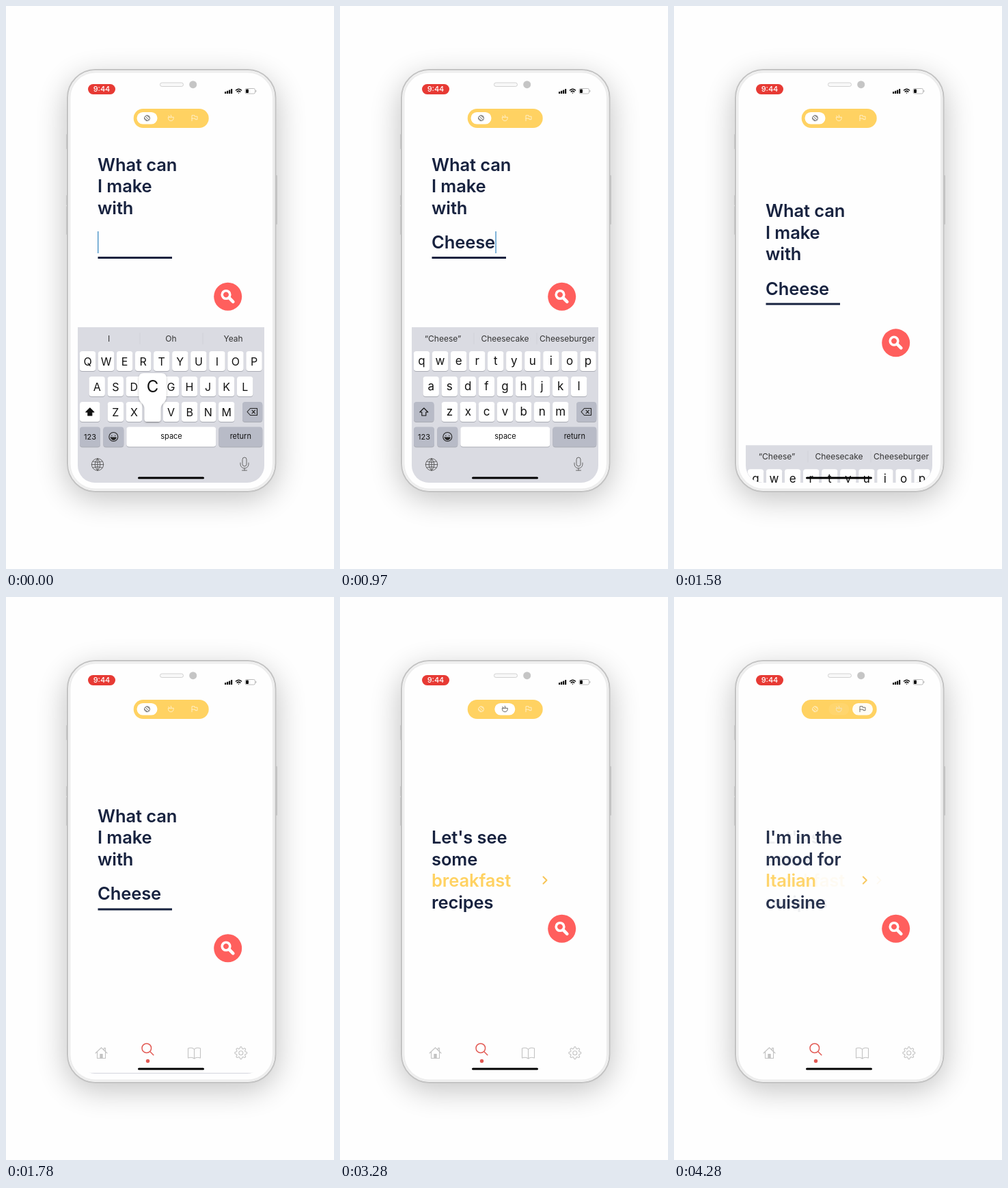
Write an HTML page that moves like this. It is 480 px wide and 822 px high and loops after 4380 ms.

```html
<!DOCTYPE html>
<html lang="en">
<head>
<meta charset="utf-8">
<style>
  html, body { margin: 0; width: 100%; height: 100%; overflow: hidden; background: #fefefe; }
  svg { display: block; width: 480px; height: 822px; font-family: Inter, "Liberation Sans", sans-serif; }
  .head { font-size: 25.5px; font-weight: 600; letter-spacing: -.1px; fill: #17223f; }
  .mid { text-anchor: middle; fill: #111; }
  .line { fill: none; stroke-linecap: round; stroke-linejoin: round; }
</style>
</head>
<body>
<svg viewBox="0 0 480 822">
  <defs>
    <filter id="blur" x="-40%" y="-20%" width="180%" height="140%"><feGaussianBlur stdDeviation="22"/></filter>
    <filter id="lift" x="-20%" y="-20%" width="140%" height="140%"><feDropShadow dx="0" dy="1" stdDeviation="1.5" flood-opacity=".3"/></filter>
    <clipPath id="screen"><rect x="105" y="110" width="273" height="586" rx="25"/></clipPath>
  </defs>
  <g id="phone"></g>
  <g id="tabs"></g>
  <g id="pages"></g>
  <g id="find"></g>
  <g clip-path="url(#screen)"><g id="board"></g></g>
  <rect x="193" y="687.5" width="97" height="3" rx="1.5"/>
  <g id="modes"></g>
</svg>
<script>
const LOOP = 4380, NAVY = '#17223f', YELLOW = '#ffd262', RED = '#ff5f5d';
const $ = id => document.getElementById(id);
const clamp = x => Math.min(1, Math.max(0, x));
const span = (t, a, b) => clamp((t - a) / (b - a));
const easeOut = x => 1 - (1 - x) ** 3;
const smooth = x => x * x * (3 - 2 * x);

const rect = (x, y, w, h, r, fill, more = '') =>
  `<rect x="${x}" y="${y}" width="${w}" height="${h}" rx="${r}" fill="${fill}" ${more}/>`;
const dot = (x, y, r, fill, more = '') => `<circle cx="${x}" cy="${y}" r="${r}" fill="${fill}" ${more}/>`;
const label = (x, y, size, s, more = '') =>
  `<text class="mid" x="${x}" y="${y}" font-size="${size}" ${more}>${s}</text>`;
const icon = (x, y, d, color, width = 1.1, fill = 'none') =>
  `<path class="line" transform="translate(${x} ${y})" d="${d}" stroke="${color}" stroke-width="${width}" style="fill:${fill}"/>`;
const ring = r => `M${-r} 0a${r} ${r} 0 1 0 ${2 * r} 0a${r} ${r} 0 1 0 ${-2 * r} 0`;
const lines = (rows, y) => rows.map((s, i) =>
  `<text class="head" x="134" y="${y + i * 31.5}" ${i == 2 && rows[3] ? `style="fill:${YELLOW}"` : ''}>${s}</text>`).join('');

function gear() {
  let d = '';
  for (let i = 0; i < 64; i++) {
    const a = i / 64 * 2 * Math.PI, r = 7.7 + 1.2 * Math.tanh(3 * Math.cos(8 * a));
    d += `${i ? 'L' : 'M'}${(r * Math.cos(a)).toFixed(2)} ${(r * Math.sin(a)).toFixed(2)}`;
  }
  return d + 'Z' + ring(3);
}

// Phone body and status bar
$('phone').innerHTML =
  rect(87, 104, 310, 616, 46, '#000', 'opacity=".23" filter="url(#blur)"') +
  [[88, 187, 22], [88, 276, 15], [88, 292, 42], [394, 247, 72]].map(([x, y, h]) => rect(x, y, 3, h, 1, '#c4c4c4')).join('') +
  rect(90, 93, 304.5, 616, 41, '#fefefe', 'stroke="#c3c3c3" stroke-width="2"') +
  rect(93, 96, 298.5, 610, 38, 'none', 'stroke="#ededed" stroke-width="3"') +
  rect(225.5, 112, 34, 5.5, 2.7, '#f8f8f8', 'stroke="#d2d2d2"') +
  dot(273.7, 114.7, 5.5, '#c5c5c5') +
  rect(120, 114, 40, 15, 7.5, '#e73a34') +
  label(140, 125.4, 11, '9:44', 'style="fill:#fff" font-weight="500"') +
  [0, 1, 2, 3].map(i => rect(320 + i * 3, 125 - i * 1.3, 2.2, 3 + i * 1.3, .5, '#111')).join('') +
  icon(340.5, 127, 'M-4-4Q0-7.5 4-4M-2.3-1.9Q0-3.8 2.3-1.9M0 0V0', '#111', 1.6) +
  rect(350, 120.5, 14.5, 7.5, 2, '#fff', 'stroke="#aaa" stroke-width=".8"') +
  rect(351, 121.5, 4, 5.5, 1, '#111') + rect(365.4, 123, 1, 2.6, .5, '#aaa');

const GREY = '#c3c3c3';
$('tabs').innerHTML =
  icon(139.5, 666, 'M-8.5 0 0-8 8.5 0M-6-2V7.5H6V-2M4-5V-7.5H6V-3', GREY) +
  rect(137.3, 667, 4.4, 6.5, .5, GREY) +
  icon(205.8, 658.7, ring(6.8) + 'M5 5 10 10', '#e25a54', 1.5) +
  dot(207.5, 677.5, 2.7, '#e25a54') +
  icon(275.5, 665.5, 'M0-5C-2-7.5-6-7.5-9-6.5V7.5C-6 6.5-2 6.5 0 8.5C2 6.5 6 6.5 9 7.5V-6.5C6-7.5 2-7.5 0-5V8', GREY) +
  icon(343.8, 665.7, gear(), GREY);

// Three pages of text
const chevron = x => icon(x, 413.5, 'M-2.5-5 2.5 0-2.5 5', '#f7c557', 2);
$('pages').innerHTML =
  `<g>${lines(['What can', 'I make', 'with'], 240.5)}<text id="word" class="head" x="134" y="354"></text>` +
  rect(134.5, 366, 108.5, 3, 0, NAVY) + rect(134, 329, 1.4, 32, 0, '#4b94c8', 'id="caret"') + '</g>' +
  `<g>${lines(["Let's see", 'some', 'breakfast', 'recipes'], 360)}${chevron(300)}</g>` +
  `<g>${lines(["I'm in the", 'mood for', 'Italian', 'cuisine'], 360)}${chevron(279.3)}</g>`;
const pages = [...$('pages').children], word = $('word'), caret = $('caret');

$('find').innerHTML = dot(324.7, 424.3, 20.5, RED) +
  icon(322, 421.5, ring(5.8), '#fff', 3.6) + icon(322, 421.5, 'M5 5 10.3 10.3', '#fff', 4.6);

// Mode switch: three small icons, one on a white pill
const modeX = [206.5, 241.3, 276];
const modeIcons = [
  ring(4) + 'M-2-2 2 2M-3 1 0 3M0-3.5 3-1',
  'M-4-1Q-4 4 0 4Q4 4 4-1ZM-3.5-3.5-2-1.5M0-4.5 .5-2',
  'M-4 4V-4H0V-2.5H4V2H1V.5H-4'
];
function drawModes(shares) {
  $('modes').innerHTML = rect(186.7, 150, 110, 28, 14, YELLOW) + modeX.map((x, i) =>
    rect(x - 15, 155, 30, 17.5, 8.7, '#fff', `opacity="${shares[i]}"`) +
    `<g opacity="${.7 * (1 - shares[i])}">${icon(x, 163.7, modeIcons[i], '#fff', .9)}</g>` +
    `<g opacity="${shares[i]}">${icon(x, 163.7, modeIcons[i], '#555', .9)}</g>`).join('');
}

// Keyboard
const rows = ['qwertyuiop', 'asdfghjkl', 'zxcvbnm'], rowX = [119.5, 133.2, 160.4];
const cap = (x, y, w, fill = '#fff') => rect(x, y + 1, w, 29, 4, '#a9abb3') + rect(x, y, w, 29, 4, fill);

function popup(x, y, s) {
  const d = `M${x - 12} ${y + 25}V${y + 10}C${x - 12} ${y + 1} ${x - 20} ${y + 2} ${x - 20} ${y - 8}V${y - 35}` +
    `Q${x - 20} ${y - 42} ${x - 13} ${y - 42}H${x + 13}Q${x + 20} ${y - 42} ${x + 20} ${y - 35}V${y - 8}` +
    `C${x + 20} ${y + 2} ${x + 12} ${y + 1} ${x + 12} ${y + 10}V${y + 25}Q${x + 12} ${y + 29} ${x + 8} ${y + 29}` +
    `H${x - 8}Q${x - 12} ${y + 29} ${x - 12} ${y + 25}Z`;
  return `<path d="${d}" fill="#fff" filter="url(#lift)"/>` + label(x, y - 14, 24, s);
}

function drawBoard({ press, hints, upper, enter }) {
  const dark = '#b8bbc7', ink = '#222';
  let out = rect(105, 469, 273, 240, 0, '#dadbe2'), top = '';
  out += hints.map((s, i) => label(150.5 + i * 91, 490, 12, s, 'style="fill:#333"')).join('');
  out += rect(195.5, 477, 1, 17, 0, '#d0d1d8') + rect(287.5, 477, 1, 17, 0, '#d0d1d8');
  rows.forEach((row, r) => [...row].forEach((c, i) => {
    const x = rowX[r] + i * 27.06, y = 504 + r * 37, s = upper ? c.toUpperCase() : c;
    out += cap(x - 11.7, y, 23.4) + label(x, y + (upper ? 20.5 : 19.5), upper ? 16 : 17, s);
    if (c === press) top = popup(x, y, s);
  }));
  out += cap(108, 578, 29.5, upper ? '#fff' : dark) +
    icon(122.8, 592.5, 'M0-5.5 6 .5H3V5.5H-3V.5H-6Z', '#111', 1.1, upper ? '#111' : 'none') +
    cap(346, 578, 29.3, dark) + icon(360.5, 592.5, 'M-7.5 0-3-5H7V5H-3ZM-.5-2.3 4 2.3M4-2.3-.5 2.3', ink) +
    cap(108, 614.5, 30, dark) + label(123, 632.8, 11, '123') +
    cap(142.3, 614.5, 30, dark) + icon(157.3, 629, ring(6.5) + 'M-2.5-2V-1.5M2.5-2V-1.5', ink) +
    icon(157.3, 629, 'M-4 1H4Q3 4.5 0 4.5Q-3 4.5-4 1Z', ink, 1, ink) +
    cap(176.3, 614.5, 131, '#fff') + label(242, 632.3, 11, 'space') +
    cap(311.3, 614.5, 64, enter ? '#fff' : dark) + label(343.3, 632.3, 11, 'return') +
    icon(134, 669.5, ring(8.7) + 'M0-8.7V8.7M-8.7 0H8.7M0-8.7Q-8 0 0 8.7Q8 0 0-8.7M-7-4.5Q0-2 7-4.5M-7 4.5Q0 2 7 4.5', '#555', .9) +
    icon(349, 668, 'M-3-6a3 3 0 0 1 6 0V1a3 3 0 0 1-6 0ZM-6-1V1a6 6 0 0 0 12 0V-1M0 7V10M-3.5 10H3.5', '#666', 1);
  $('board').innerHTML = out + top;
}

// [start, typed letters, pressed key]
const typing = [[0, 0, 'c'], [70, 1], [170, 1, 'h'], [270, 2, 'e'], [370, 3], [470, 3, 'e'],
  [570, 4, 's'], [670, 5], [770, 5, 'e'], [870, 6]];
const hintSets = [
  [0, 'I', 'Oh', 'Yeah'],
  [370, '“Che”', 'Cheese', 'Check'],
  [870, '“Cheese”', 'Cheesecake', 'Cheeseburger']
];
const latest = (list, t) => list.filter(e => e[0] <= t).pop();

function draw(t) {
  const [, count, press] = latest(typing, t);
  const down = easeOut(span(t, 1400, 1850));
  const second = smooth(span(t, 2670, 3070)), third = span(t, 4000, 4290);
  const shift = 89 * down + .5 * span(t, 1800, 2200);

  word.textContent = 'Cheese'.slice(0, count);
  caret.setAttribute('x', count ? 134.3 + word.getComputedTextLength() : 134);
  caret.style.display = down ? 'none' : '';
  pages[0].setAttribute('transform', `translate(0 ${shift})`);

  const shares = [1 - second, second * (1 - third), third];
  pages.forEach((p, i) => p.setAttribute('opacity', shares[i]));
  drawModes(shares);

  const rise = 29.5 * easeOut(span(t, 2670, 3170));
  $('find').setAttribute('transform', `translate(0 ${shift - rise})`);

  $('board').style.display = down < 1 ? '' : 'none';
  $('tabs').style.display = down ? '' : 'none';
  if (down < 1) {
    drawBoard({ press, hints: latest(hintSets, t).slice(1), upper: t < 70, enter: t >= 1270 });
    $('board').setAttribute('transform', `translate(0 ${227 * down})`);
  }
}

// The picture advances ten times a second
let shown = -1;
function tick(now) {
  const t = Math.max(0, Math.floor((now % LOOP + 30) / 100) * 100 - 30);
  if (t !== shown) draw(shown = t);
  requestAnimationFrame(tick);
}
draw(0);
requestAnimationFrame(tick);
</script>
</body>
</html>
```
